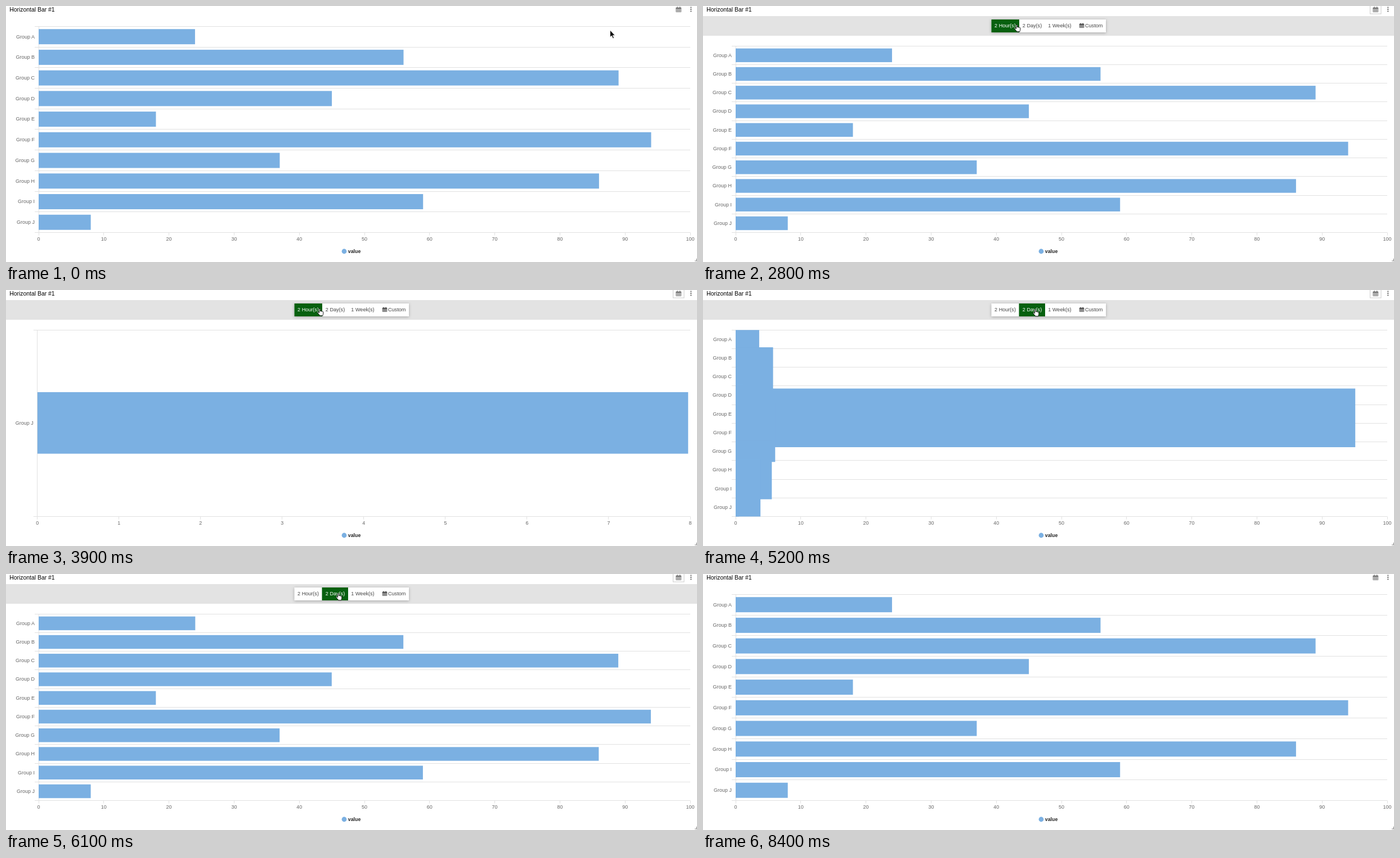
Write an HTML page that moves like this. It is 1228 px wide and 456 px high and loops after 8.8 s.

```html
<!DOCTYPE html>
<html lang="en">
<head>
<meta charset="utf-8">
<title>Horizontal bar chart</title>
<style>
  html, body { margin: 0; width: 100%; height: 100%; overflow: hidden; background: #fff; }
  svg { display: block; font: 9px "Liberation Sans", Arial, sans-serif; }
  .title { font-size: 10.4px; fill: #000; }
  .label { fill: #666; }
  .grid { stroke: #e1e1e1; fill: none; }
  .bar { fill: #7bb0e2; }
  .legend { font-size: 8.8px; font-weight: bold; fill: #222; }
  .panel { filter: drop-shadow(0 1px 2.5px rgba(0, 0, 0, .28)); }
  .option { font-size: 9.1px; fill: #444; }
  .mid { text-anchor: middle; }
  .end { text-anchor: end; }
</style>
</head>
<body>
<svg id="stage" width="1228" height="456" viewBox="0 0 1228 456">
  <defs>
    <g id="calendar">
      <path d="M.5 2H9.5V9.6H.5ZM.5 4.2H9.5M.5 6H9.5M.5 7.8H9.5M2.8 4.2V9.6M5 4.2V9.6M7.2 4.2V9.6" fill="none" stroke="currentColor" stroke-width=".75"/>
      <path d="M.5 2H9.5V4H.5ZM2 .3H3.4V3H2ZM6.6 .3H8V3H6.6Z" fill="currentColor"/>
    </g>
    <clipPath id="plot"><rect id="plotBox" height="400" width="1170"/></clipPath>
  </defs>
  <text class="title" x="6.3" y="9.8">Horizontal Bar #1</text>
  <g id="chart">
    <g id="axes"></g>
    <g id="bars" clip-path="url(#plot)"></g>
    <g id="frame"></g>
    <circle class="bar" cx="601" cy="437" r="4.4"/>
    <text class="legend" x="607.8" y="440">value</text>
  </g>
  <path id="grip" d="M1227.5 450V454.5M1224 454H1228" stroke="#888" fill="none"/>
  <g id="picker">
    <rect id="strip" y="18" width="1228" fill="#e3e3e3"/>
    <g id="panel">
      <rect class="panel" x="512.5" y="24" width="203.5" height="23" fill="#fff"/>
      <rect id="chosen" y="24" height="23" fill="#07600f"/>
      <text class="option mid" x="537" y="38.2">2 Hour(s)</text>
      <text class="option mid" x="585" y="38.2">2 Day(s)</text>
      <text class="option mid" x="634" y="38.2">1 Week(s)</text>
      <use href="#calendar" transform="translate(668.7 30.2) scale(.87)" color="#444"/>
      <text class="option" x="679" y="38.2">Custom</text>
    </g>
  </g>
  <rect id="scroll" x="1224.5" y="20" width="3.5" fill="#bdbdbd"/>
  <rect id="button" x="1185.5" y="-1" width="19.5" height="15" stroke="#ccc"/>
  <use href="#calendar" x="1190.3" y="1" color="#777"/>
  <g fill="#666"><circle cx="1217.3" cy="2.6" r="1.15"/><circle cx="1217.3" cy="6" r="1.15"/><circle cx="1217.3" cy="9.4" r="1.15"/></g>
  <g id="cursor">
    <path id="arrow" d="M0 0V12.6L2.9 10 5 14.8 7 13.9 5 9.3H8.8Z" fill="#111" stroke="#fff" stroke-width=".8"/>
    <path id="hand" transform="translate(-4.5)" d="M3.6 7.5V1.4C3.6 .2 5.5 .2 5.5 1.4V5C5.6 4.1 7.3 4.2 7.4 5.2 7.5 4.4 9.1 4.5 9.2 5.6 9.4 4.9 10.8 5.1 10.8 6.3V9.2C10.8 10.6 9.9 11.1 9.9 12.8H4.6C4.4 11.3 2 9.8 .8 7.6 .3 6.5 1.6 6 2.4 6.8Z" fill="#fff" stroke="#111"/>
  </g>
</svg>
<script>
const LOOP = 8800, STEP = 100;
const VALUES = [24, 56, 89, 45, 18, 94, 37, 86, 59, 8];
const NAMES = [...'ABCDEFGHIJ'].map(c => 'Group ' + c);
const BOTTOM = 403.6, RIGHT = 1216;
const TEN_LEFT = 58, ONE_LEFT = 55.7;
const LOW = 71.2, HIGH = 36.3;
const TO_ONE = 3062, TO_TEN = 5178;

// time, x, y of the pointer tip
const PATH = [
  [0, 1073.5, 43], [300, 1166, 12], [400, 1163, 7], [500, 1163, 7], [900, 1189.5, 8],
  [1500, 1189.5, 8], [1800, 924, 22], [1900, 924, 22], [2300, 564, 34], [2400, 564, 34],
  [2600, 557.5, 33], [3900, 557.5, 33], [4200, 590.5, 34], [6300, 590.5, 34],
  [6400, 588.5, 37], [6500, 588.5, 37], [6700, 650, 43], [7200, 1202, 8],
  [7300, 1190, 8], [7900, 1190, 8], [8200, 393, 6], [LOOP, 393, 6]
];

const $ = id => document.getElementById(id);
const lerp = (a, b, p) => a + (b - a) * p;
const clamp = v => Math.min(1, Math.max(0, v));
const cubicOut = v => 1 - (1 - clamp(v)) ** 3;
const crisp = v => Math.floor(v) + .5;
const show = (node, on) => node.style.display = on ? '' : 'none';

function set(node, attrs) {
  for (const key in attrs) node.setAttribute(key, attrs[key]);
}

function add(parent, tag, attrs, text = '') {
  const node = document.createElementNS('http://www.w3.org/2000/svg', tag);
  set(node, attrs);
  node.textContent = text;
  return parent.appendChild(node);
}

function makeAxis(left, top, names, max, step) {
  const group = add($('axes'), 'g', {});
  const band = (BOTTOM - top) / names.length;
  let d = `M${crisp(left)} ${top}V${BOTTOM}`;
  for (let i = 0; i <= names.length; i++) d += `M${left - 7} ${crisp(top + i * band)}H${RIGHT}`;
  names.forEach((name, i) =>
    add(group, 'text', { class: 'label end', x: left - 7, y: top + (i + .5) * band + 2.9 }, name));
  for (let v = 0; v <= max; v += step) {
    const x = lerp(left, RIGHT, v / max);
    d += `M${crisp(x)} ${BOTTOM}v5`;
    add(group, 'text', { class: 'label mid', x, y: 418.4 }, v);
  }
  add(group, 'path', { class: 'grid', d });
  return group;
}

const axes = {
  high: makeAxis(TEN_LEFT, HIGH, NAMES, 100, 10),
  low: makeAxis(TEN_LEFT, LOW, NAMES, 100, 10),
  one: makeAxis(ONE_LEFT, LOW, NAMES.slice(-1), 8, 1)
};
const bars = VALUES.map(() => add($('bars'), 'rect', { class: 'bar' }));
const options = document.querySelectorAll('.option');

const ONE_BAR = { x: ONE_LEFT, mid: (LOW + BOTTOM) / 2, w: RIGHT - ONE_LEFT, h: 110 };

function tenBar(i, top) {
  const band = (BOTTOM - top) / 10;
  return { x: TEN_LEFT, mid: top + (i + .5) * band, w: (RIGHT - TEN_LEFT) * VALUES[i] / 100, h: band * .735 };
}

function mix(a, b, p) {
  const out = {};
  for (const key in a) out[key] = lerp(a[key], b[key], p);
  return out;
}

function drawBars(t, top, single) {
  const p = cubicOut((t - (single ? TO_ONE : TO_TEN)) / 1000);
  bars.forEach((bar, i) => {
    let shape = tenBar(i, top), opacity = 1;
    if (single) {
      if (i) opacity = 1 - cubicOut((t - TO_ONE) / 200);
      else shape = mix(shape, ONE_BAR, p);
    } else if (t > TO_TEN) {
      shape = mix(i ? { ...shape, w: 0, h: 110 } : ONE_BAR, shape, p);
    }
    set(bar, { x: shape.x, y: shape.mid - shape.h / 2, width: shape.w, height: shape.h, opacity });
  });
  set($('plotBox'), { x: single ? ONE_LEFT : TEN_LEFT, y: top, height: BOTTOM - top });
}

function drawPicker(t) {
  // open amount of the strip, 0 to 1
  const opening = clamp((t - 1380) / 320), closing = clamp((t - 7780) / 320);
  const open = opening * (1 - closing), h = 35 * open;
  show($('picker'), open > 0);
  set($('strip'), { height: h });
  set($('picker'), { opacity: lerp(.15, 1, open) });
  set($('panel'), { transform: `translate(0 ${(h - 35) / 2})` });

  const pick = t < 2800 ? -1 : t < 4800 ? 0 : 1;
  show($('chosen'), pick >= 0);
  set($('chosen'), { x: pick ? 561.5 : 512.5, width: pick ? 46.5 : 49.5 });
  options.forEach((o, i) => o.style.fill = i === pick ? '#fff' : '');
  return h;
}

function drawCursor(t, open) {
  const i = PATH.findIndex(k => k[0] > t);
  const [t0, x0, y0] = PATH[i - 1], [t1, x1, y1] = PATH[i];
  const p = (t - t0) / (t1 - t0), x = lerp(x0, x1, p), y = lerp(y0, y1, p);
  const hand = x > 1184 && x < 1206 && y < 15 || open && x > 512 && x < 716 && y > 24 && y < 47;
  set($('cursor'), { transform: `translate(${x} ${y})` });
  show($('cursor'), t < 8400);
  show($('hand'), hand);
  show($('arrow'), !hand);
}

function draw(t) {
  const low = t >= 1800 && t < 8200, single = t >= 3100 && t < 5200;
  const pushed = t >= 1400 && t < 1800;
  const h = drawPicker(t);
  show(axes.high, !low);
  show(axes.low, low && !single);
  show(axes.one, single);
  drawBars(t, low ? LOW : HIGH, single);
  set($('chart'), { transform: `translate(${pushed ? -2.6 : 0} ${low ? h - 35 : h})` });

  show($('scroll'), pushed);
  show($('grip'), !pushed);
  set($('scroll'), { height: 435 * 437 / (437 + h) });
  const pressed = t >= 1400 && t < 1600 || t >= 7800 && t < 8000;
  show($('button'), t >= 1400 && t < 8200);
  set($('button'), { fill: pressed ? '#e0e0e0' : '#fff' });
  drawCursor(t, low);
}

function tick() {
  draw(Math.floor(performance.now() % LOOP / STEP) * STEP);
  requestAnimationFrame(tick);
}
tick();
</script>
</body>
</html>
```
